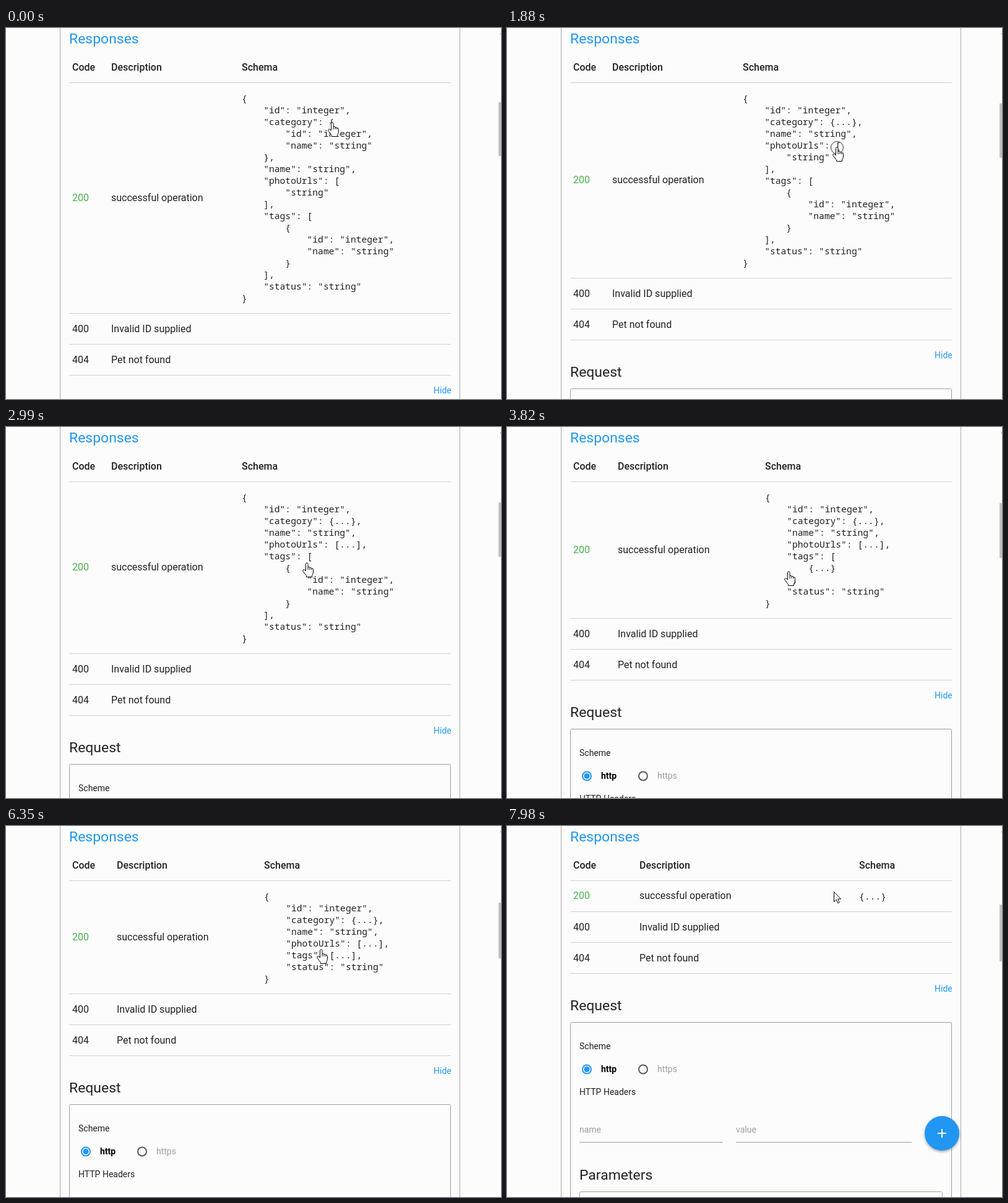
Write an HTML page that moves like this. It is 800 by 600 pixels and loops after 8 s.

```html
<!DOCTYPE html>
<html lang="en">
<head>
<meta charset="utf-8">
<title>Response schema</title>
<style>
  html, body { margin: 0; width: 100%; height: 100%; overflow: hidden; background: #fcfcfc; }
  svg { display: block; font: 16px Roboto, sans-serif; fill: #212121; }
  text { white-space: pre; }
  .title { font-size: 22.96px; }
  .head { font-weight: 500; }
  .small { font-size: 14px; }
  .pick { font-weight: 700; fill: #000; }
  .dim { fill: #9e9e9e; }
  .blue { fill: #2196f3; }
  .ok { fill: #4caf50; }
  .code { font: 14.66px "Noto Sans Mono", monospace; }
  .rule { fill: #d0d0d0; }
  .box { fill: none; stroke: #9e9e9e; }
  .fab { filter: drop-shadow(0 2px 2px rgba(0, 0, 0, .35)); }
  .cursor { fill: #fff; stroke: #000; stroke-linejoin: round; }
</style>
</head>
<body>
<svg width="800" height="600" viewBox="0 0 800 600">
  <g id="page"></g>
  <g id="pointer" class="cursor">
    <circle id="click" cx="7.5" cy="1.5" r="10" fill="none" stroke="#222"/>
    <path id="hand" d="M5.5 14V2.5a1.75 1.75 0 0 1 3.5 0V7.5q3-.8 3 1q2.7-.6 2.9 1.2q2.6-.3 2.6 1.8V16q0 2.5-2 5V23.5H6.5V21.5L1 14.5q-1-2.5 1.5-3q1.5 0 3 2.5ZM9 7.5v4.5M12 8.5v3.5M14.9 9.7v2.5"/>
    <path id="arrow" d="M.5.5V16.5L4.2 13L6.7 18.8L9.2 17.7L6.7 12H11.5Z"/>
  </g>
</svg>
<script>
const LOOP = 8000;
const $ = id => document.getElementById(id);

// Schema with ever more nodes folded.
const item = { id: 'integer', name: 'string' };
const full = {
  id: 'integer', category: item, name: 'string',
  photoUrls: ['string'], tags: [item], status: 'string'
};
const noCategory = { ...full, category: '{...}' };
const noUrls = { ...noCategory, photoUrls: '[...]' };
const noItem = { ...noUrls, tags: ['{...}'] };
const noTags = { ...noUrls, tags: '[...]' };

// start, schema, description x, schema x, scrollbar top and bottom
const states = [
  [0, full, 170, 381, 120, 207],
  [250, noCategory, 170, 381, 122, 210],
  [2030, noUrls, 170, 381, 122, 210],
  [3820, noItem, 179, 417, 123, 212],
  [5320, noTags, 179, 417, 124, 214],
  [7440, '{...}', 214, 569, 127, 219]
];

// start, ms per step, steps, end x, end y
const moves = [
  [900, 140, 4, 526, 192],
  [2440, 134, 8, 451, 235],
  [3540, 1, 1, 448, 233],
  [4090, 140, 6, 514, 212],
  [6350, 137, 8, 416, 108],
  [7440, 1, 1, 425, 109],
  [7840, 1, 1, 470, 116],
  [7980, 1, 1, 528, 106]
];
const clicks = [[120, 250], [1880, 2030], [5170, 5320]];

const text = (x, y, str, cls = '') => `<text x="${x}" y="${y}" class="${cls}">${str}</text>`;
const rect = (x, y, w, h, fill) => `<rect x="${x}" y="${y}" width="${w}" height="${h}" fill="${fill}"/>`;
const rule = y => `<rect class="rule" x="102" y="${y}" width="617" height="1"/>`;
const box = (x, y, w) => `<rect class="box" x="${x}" y="${y}" width="${w}" height="700" rx="2"/>`;
const ring = (x, color) => `<circle cx="${x}" cy="155.5" r="7" fill="none" stroke="${color}" stroke-width="2"/>`;

const requestForm =
  text(691, 30, 'Hide', 'small blue') +
  text(102, 60, 'Request', 'title') +
  box(102.5, 79.5, 616) +
  text(117, 123, 'Scheme', 'small') +
  ring(129, '#2196f3') + '<circle class="blue" cx="129" cy="155.5" r="4.6"/>' +
  text(152, 160, 'http', 'small pick') +
  ring(220, '#5a5a5a') + text(243, 160, 'https', 'small dim') +
  text(117, 197, 'HTTP Headers', 'small') +
  text(117, 258, 'name', 'small dim') + text(370, 258, 'value', 'small dim') +
  rect(117, 273, 232, 1, '#9e9e9e') + rect(370, 273, 284, 1, '#9e9e9e') +
  text(117, 334, 'Parameters', 'title') +
  box(117.5, 353.5, 586) +
  '<circle class="blue fab" cx="703" cy="259" r="28"/>' +
  rect(696, 258, 14, 2, '#fff') + rect(702, 252, 2, 14, '#fff');

function drawPage([, schema, descX, schemaX, top, bottom]) {
  const lines = JSON.stringify(schema, null, 4)
    .replace(/"(.\.{3}.)"/g, '$1').split('\n');
  const end = 119 + lines.length * 19;
  const mid = Math.round((88 + end) / 2) + 5;
  const row = (y, code, desc, cls) => text(107, y, code, cls) + text(descX, y, desc);
  $('page').innerHTML =
    rect(87, 0, 1, 600, '#aaa') + rect(733, 0, 1, 600, '#aaa') +
    rect(796, top, 4, bottom - top, '#c1c1c1') + rect(799, 9, 1, 1, '#555') +
    text(102, 25, 'Responses', 'title blue') +
    text(107, 69, 'Code', 'head') + text(descX, 69, 'Description', 'head') +
    text(schemaX, 69, 'Schema', 'head') +
    [88, end, end + 50, end + 100].map(rule).join('') +
    row(mid, 200, 'successful operation', 'ok') +
    row(end + 31, 400, 'Invalid ID supplied') +
    row(end + 81, 404, 'Pet not found') +
    lines.map((line, i) => text(schemaX, 119 + 19 * i, line, 'code')).join('') +
    `<g transform="translate(0 ${end + 100})">${requestForm}</g>`;
}

function pointerAt(t) {
  let x = 520, y = 152;
  for (const [start, gap, steps, endX, endY] of moves) {
    if (t < start) break;
    const k = Math.min(1, (Math.floor((t - start) / gap) + 1) / steps);
    x += (endX - x) * k;
    y += (endY - y) * k;
  }
  return [Math.round(x), Math.round(y)];
}

const show = (id, on) => $(id).setAttribute('visibility', on ? 'visible' : 'hidden');
const origin = performance.now();
let current;

function frame() {
  const t = (performance.now() - origin) % LOOP;
  const state = states.findLast(s => t >= s[0]);
  if (state !== current) drawPage(current = state);
  $('pointer').setAttribute('transform', `translate(${pointerAt(t)})`);
  show('click', clicks.some(([from, to]) => t >= from && t < to));
  show('hand', t < 7440);
  show('arrow', t >= 7440);
  requestAnimationFrame(frame);
}
frame();
</script>
</body>
</html>
```
